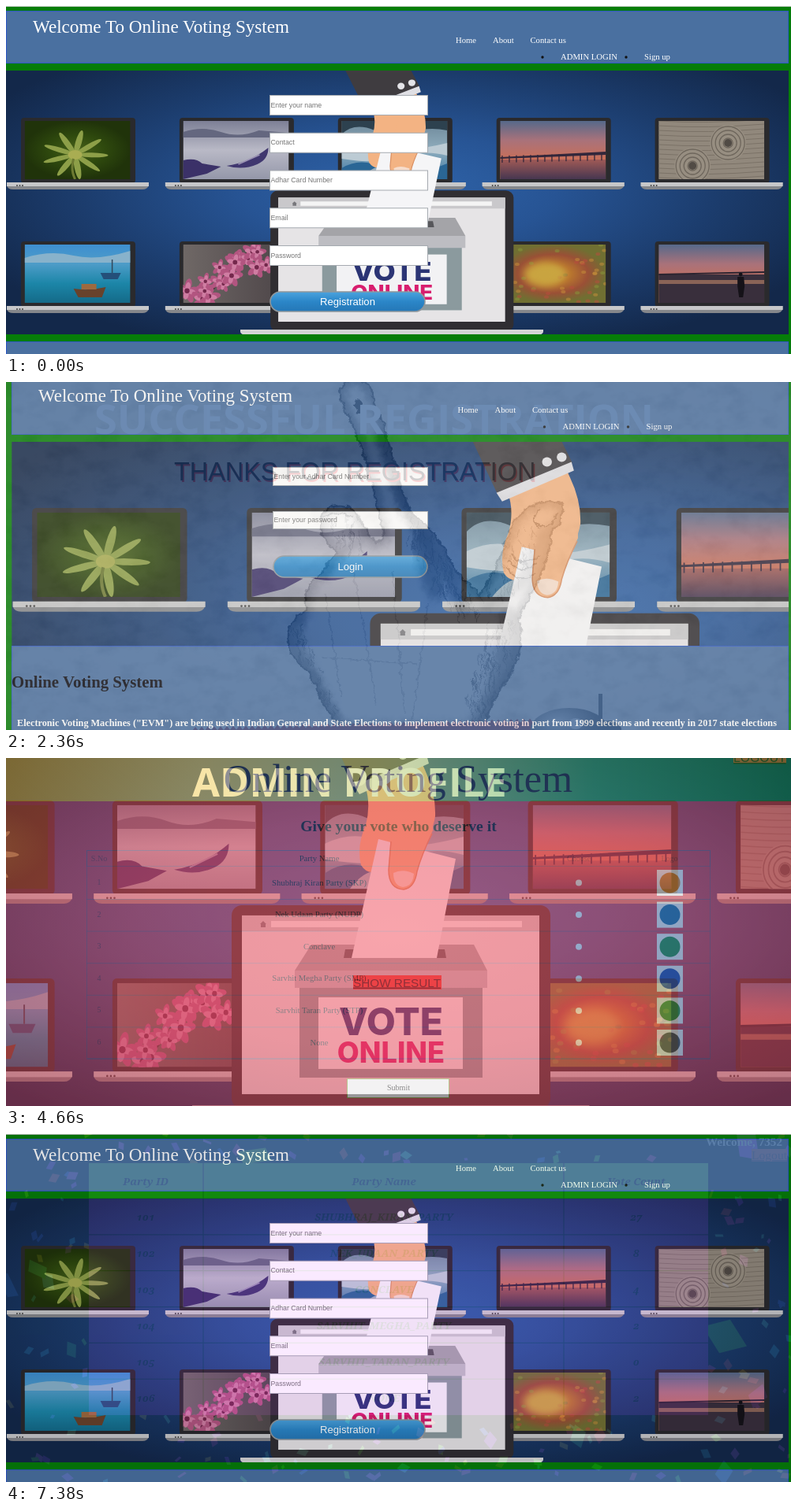
An HTML page that plays this animation: 995x442 px, repeating every 7.44 s.

```html
<!DOCTYPE html>
<html lang="en">
<head>
<meta charset="utf-8">
<title>Online voting slideshow</title>
<style>
html, body { margin: 0; width: 100%; height: 100%; overflow: hidden; background: #000; }
.scene { position: absolute; left: 0; top: 0; width: 100%; height: 100%; will-change: opacity; }
.defs { position: absolute; width: 0; height: 0; }
.fade { opacity: 0; animation: show 7440ms infinite backwards; }
.last { animation-name: showLast; }
filter { color-interpolation-filters: sRGB; }
text { font-family: "Liberation Serif", serif; }
.sans { font-family: "Liberation Sans", sans-serif; }
.title { font-family: "Open Sans", sans-serif; font-weight: 700; }
.cell { font: italic 700 13.3px "Noto Serif", serif; font-variant-numeric: oldstyle-nums; text-anchor: middle; }
.logo { font-family: Inter, sans-serif; font-weight: 800; }
.mid { text-anchor: middle; }
.bold { font-weight: 700; }
.link { text-decoration: underline; }
@keyframes show {
  0% { opacity: 0; animation-timing-function: step-end; }
  9.408% { opacity: .1; animation-timing-function: steps(9, end); }
  16.666% { opacity: 1; animation-timing-function: step-end; }
  33.4%, 100% { opacity: 0; }
}
@keyframes showLast {
  0% { opacity: 0; animation-timing-function: step-end; }
  9.408% { opacity: .1; animation-timing-function: steps(9, end); }
  16.666% { opacity: 1; animation-timing-function: step-end; }
  26.075% { opacity: .9; animation-timing-function: steps(9, end); }
  33.333%, 100% { opacity: 0; }
}
</style>
</head>
<body>
<script>
let seed = 41;
const rnd = (a = 1, b = 0) => b + (a - b) * ((seed = seed * 16807 % 2147483647) / 2147483647);
const range = (n, f) => Array.from({ length: n }, (_, i) => f(i)).join('');

const rect = (x, y, w, h, fill, more = '') =>
  `<rect x="${x}" y="${y}" width="${w}" height="${h}" fill="${fill}" ${more}/>`;
const dot = (x, y, rx, fill, ry = rx, more = '') =>
  `<ellipse cx="${x}" cy="${y}" rx="${rx}" ry="${ry}" fill="${fill}" ${more}/>`;
const path = (d, fill, more = '') => `<path d="${d}" fill="${fill}" ${more}/>`;
const line = (d, stroke, width, more = '') =>
  path(d, 'none', `stroke="${stroke}" stroke-width="${width}" ${more}`);
const text = (x, y, str, size, fill, cls = '') =>
  `<text x="${x}" y="${y}" font-size="${size}" fill="${fill}" class="${cls}">${str}</text>`;
const clip = (x, y, w, h, inner) =>
  `<svg x="${x}" y="${y}" width="${w}" height="${h}" viewBox="${x} ${y} ${w} ${h}">${inner}</svg>`;
const stops = list => list.map((c, i) => `<stop offset="${i / (list.length - 1)}" stop-color="${c}"/>`).join('');
const linear = (id, list, across = false) =>
  `<linearGradient id="${id}" ${across ? '' : 'x2="0" y2="1"'}>${stops(list)}</linearGradient>`;
const radial = (id, list, more = '') => `<radialGradient id="${id}" ${more}>${stops(list)}</radialGradient>`;
const wall = (sx, sy, x, y) => `<use href="#wall" transform="matrix(${sx} 0 0 ${sy} ${x} ${y})"/>`;

// Pictures on the small laptops, 134 x 74 each
const full = fill => rect(0, 0, 134, 74, fill);
const petals = (x, y, n, len, w, fill) => range(n, i =>
  dot(x, y - len / 2, w, fill, len / 2, `transform="rotate(${i * 360 / n + 12} ${x} ${y})"`));
const rings = (x, y) => [6, 11, 16, 21].map(r =>
  `<circle cx="${x}" cy="${y}" r="${r}" fill="none" stroke="#6e665c" stroke-width="1.3"/>`).join('') + dot(x, y, 5, '#514b45');
const blossom = (x, y, r) => petals(x, y, 5, r, r * .27, '#b25580') + petals(x, y, 4, r * .7, r * .2, '#cf7da2')
  + dot(x, y, r * .2, '#74284c');

const flower = full('url(#leaf)') + `<g transform="translate(0 12) scale(1 .75)">${petals(64, 41, 9, 42, 4, '#8d9f48')}</g>`
  + dot(64, 43, 9, '#a9ad52', 6) + line('M62 48Q58 62 64 74', '#6d7a32', 3);
const rowboat = full('url(#mist)') + path('M0 14Q25 6 48 14T96 12L134 15V21H0Z', '#64677f')
  + path('M0 50Q16 46 24 54L48 58 30 67 0 74Z', '#3b3168')
  + path('M55 57Q84 53 108 34Q108 49 94 55Q76 63 55 57Z', '#40376f') + line('M70 55L97 43', '#9b93b4', 1.5);
const ice = full('url(#frost)') + path('M0 0H134V12Q108 7 88 15T42 12 0 17Z', '#2d414f')
  + path('M0 34Q28 22 52 32T134 28V44Q104 36 78 46T0 48Z', '#bccbd4')
  + path('M0 60Q24 45 54 60T134 54V74H0Z', '#2a6695') + path('M24 74Q45 49 62 64L84 74Z', '#9fb6c4');
const pier = full('url(#sunset)') + rect(0, 49, 134, 25, 'url(#dusk)')
  + path('M0 46L134 39V43L0 48Z', '#33273b') + range(15, i => rect(9 * i + 2, 44 - i * .2, 1.3, 9, '#33273b'));
const sand = full('#91887c') + range(13, i => line(`M0 ${i * 6}Q60 ${i * 6 + 4} 134 ${i * 6 - 2}`, '#7b7267', 1))
  + dot(88, 28, 23, '#978e81') + dot(43, 57, 23, '#978e81') + rings(88, 28) + rings(43, 57);
const harbour = full('url(#sea)') + path('M0 17Q32 7 62 14T134 8V23H0Z', '#88b2cb')
  + path('M96 36H122L118 44H100Z', '#244f79') + line('M111 19V36', '#31485c', 1.5)
  + path('M62 56Q82 59 103 54L98 67H68Z', '#68422b') + path('M72 50H91V57H72Z', '#9d6a3f');
const spring = full('url(#twig)') + line('M18 74Q60 35 92 0', '#49313a', 4)
  + range(16, i => blossom(14 + i * 5.5 + rnd(9, -9), 62 - i * 3.2 + rnd(15, -15), rnd(16, 10)));
const daisy = full('url(#bloom)') + range(60, () =>
  dot(rnd(134).toFixed(1), rnd(74).toFixed(1), 3, ['#c9923a', '#bb4c3e', '#879a3a'][rnd(3) | 0], 2, 'opacity=".5"'))
  + dot(56, 38, 25, '#c9a440', 15, 'filter="url(#soft)"');
const beach = full('url(#sunset)') + path('M0 38H134V74H0Z', '#392f3c') + rect(0, 45, 134, 5, '#8a6457')
  + line('M0 38L134 35', '#2c2430', 2) + dot(104, 38, 2.4, '#151218') + path('M100 41H108L109 53 107 67H102L100 53Z', '#151218');

const laptop = (col, row, picture) => {
  const x = 19 + 200.9 * col, y = row ? 299 : 142;
  return rect(x, y, 145, 83, '#2a2a2d', 'rx="4"')
    + `<svg x="${x + 4.6}" y="${y + 4}" width="134" height="74" viewBox="0 0 134 74">${picture}</svg>`
    + path(`M${x - 18} ${y + 82}h180v4q-2 5 -8 5h-164q-7 0 -8 -5z`, '#85878b')
    + rect(x - 18, y + 82, 180, 5, '#c6c7c9') + range(3, i => dot(x - 5 + i * 3.5, y + 86, 1, '#444'));
};

const box = rect(286, 187, 404, 258, '#302e32', 'rx="13"') + rect(299, 200, 377, 227, '#e6e4e6')
  + rect(299, 200, 377, 20, '#c9c8cb') + rect(336, 207, 318, 8, '#f4f4f4') + path('M322 211l4-4 4 4h-1v4h-6v-4z', '#77777c')
  + path('M387 237H593L610 270H366Z', '#a4a4a8') + path('M430 243H556L558 254H428Z', '#57575b')
  + rect(372, 285, 232, 121, '#8b9a9e') + rect(366, 270, 244, 22, '#bdbdc2')
  + rect(396, 304, 183, 91, '#f2f2f4')
  + text(488, 352, 'VOTE', 48, '#2b3474', 'logo mid') + text(488, 387, 'ONLINE', 36.2, '#d81e6e', 'logo mid');
const hand = path('M455 35Q463 58 456 85Q444 112 450 136Q460 152 478 140L520 118Q540 100 544 74Q545 45 531 15L526 4Z', '#f3b383')
  + path('M472 103L570 128 546 254H438Z', '#f5f5f7')
  + path('M488 92L485 142Q485 166 504 167Q518 165 521 144Q528 118 541 92L540 55H500Z', '#f3b383')
  + line('M488 106L485 142Q485 166 504 167Q518 165 521 144Q527 122 540 96', '#d98f62', 1.5)
  + path('M491 146Q503 140 517 147Q516 163 503 164Q491 162 491 146Z', '#f6dccb')
  + path('M410 -34H519L534 -3 442 36Z', '#3f3c40') + path('M441 35L533 -4 536 7 448 46Z', '#dfdfe4')
  + dot(503, -4, 6, '#e4e4e8') + dot(521, -10, 6, '#e4e4e8');

const outline = 'M425 440L405 415 385 370Q360 350 358 330Q352 308 380 290Q374 262 400 243L420 215Q404 206 398 185'
  + 'Q398 160 420 157Q444 156 450 178L470 205 479 198 467 140 450 80 425 25Q420 2 435 -3Q457 -6 464 15L480 60 495 115 512 165'
  + 'Q545 185 570 240L600 270Q622 238 637 195Q648 156 685 152Q708 152 706 164Q704 184 692 187Q690 225 668 265L650 300'
  + 'Q660 330 640 370L615 410 606 440Z';

const defs = radial('room', ['#2f64aa', '#275494', '#1c3d6e', '#13284a'], 'cx=".5" cy=".42" r=".6"')
  + radial('leaf', ['#47601a', '#2f4a0e', '#20330a']) + linear('mist', ['#7d8096', '#b9b9c6', '#9497a9'])
  + linear('frost', ['#6d8799', '#8fadbd', '#3a77a4']) + linear('sunset', ['#56698a', '#a9727a', '#c96f58', '#d08f60'])
  + linear('dusk', ['#a05a56', '#463650']) + linear('sea', ['#3e8fd0', '#4d9cc8', '#1c86a8', '#146a88'])
  + linear('twig', ['#6f6866', '#4c4447'], true) + radial('bloom', ['#d0ae48', '#b9762f', '#9a5036', '#706f32'])
  + linear('button', ['#4ba3de', '#2b86c8', '#2577b6']) + linear('banner', ['#e0a010', '#f2cc50', '#b8cc70', '#30a050', '#0a8030'], true)
  + radial('red', ['#fc5562', '#ee4a5a', '#b83448'], 'r=".68"') + radial('tone', ['#e9e4db', '#e0dad0', '#cfc8bd'], 'r=".7"')
  + radial('metal', ['#b9b9b9', '#777', '#333'], 'cx=".35" cy=".3"')
  + `<filter id="paper" x="0" y="0" width="1" height="1"><feTurbulence type="fractalNoise" baseFrequency=".035 .05" numOctaves="6" seed="4"/>
     <feColorMatrix values="0 0 0 0 .4  0 0 0 0 .38  0 0 0 0 .35  1.6 0 0 0 -.7"/></filter>
     <filter id="rough"><feTurbulence type="fractalNoise" baseFrequency=".12" numOctaves="3" seed="8"/>
     <feDisplacementMap in="SourceGraphic" scale="8" xChannelSelector="R" yChannelSelector="G"/></filter>
     <filter id="soft" x="-.5" y="-.5" width="2" height="2"><feGaussianBlur stdDeviation="5"/></filter>
     <clipPath id="skin"><path d="${outline}"/></clipPath>`
  + '<g id="wall">' + rect(0, 82, 995, 360, 'url(#room)')
  + [flower, rowboat, ice, pier, sand].map((p, i) => laptop(i, 0, p)).join('')
  + laptop(0, 1, harbour) + laptop(1, 1, spring) + laptop(3, 1, daisy) + laptop(4, 1, beach)
  + `<g transform="translate(117 104.5) scale(.7628 .6944)">${box}${hand}</g>`
  + path('M297 411H681V414Q680 418 672 418H306Q298 418 297 414Z', '#d4d4d6') + '</g>';

// Shared parts of the two form pages
const panel = (x, y, w, h) => rect(x + .5, y + .5, w - 1, h - 1, '#4a70a0', 'stroke="#2f58c4"');
const nav = (x, y) => text(x, y, 'Home', 10.67, '#fff') + text(x + 47, y, 'About', 10.67, '#fff')
  + text(x + 94.5, y, 'Contact us', 10.67, '#fff') + text(x + 133, y + 21, 'ADMIN LOGIN', 10.67, '#fff')
  + text(x + 239, y + 21, 'Sign up', 10.67, '#fff') + dot(x + 110, y + 18, 1.7, '#111') + dot(x + 216, y + 18, 1.7, '#111');
const field = (x, y, w, h, hint) => rect(x + .5, y + .5, w - 1, h - 1, '#fff', 'stroke="#a5aab0"')
  + text(x + 1.5, y + h / 2 + 2.5, hint, 8.75, '#757575', 'sans');
const button = (x, y, w, h, label) =>
  rect(x + 1, y + 1, w - 2, h - 2, 'url(#button)', `rx="${h / 2 - 1}" stroke="#8f979c" stroke-width="1.6"`)
  + text(x + w / 2, y + h / 2 + 4.6, label, 13.1, '#fff', 'sans mid');
const heading = 'Welcome To Online Voting System';

const register = rect(0, 0, 995, 442, '#067d08') + rect(0, 0, 995, 1, '#c9cfc9') + panel(0, 6, 992, 67)
  + text(34, 34, heading, 23.1, '#fff') + nav(570, 47)
  + clip(0, 82, 992, 335, wall(1, 1, 0, 0))
  + ['Enter your name', 'Contact', 'Adhar Card Number', 'Email', 'Password']
    .map((h, i) => field(334, 113 + i * 47.75, 201, 26, h)).join('')
  + button(334, 362, 198, 27, 'Registration') + panel(0, 426, 992, 17);

const hatch = (x1, y1, x2, y2, n, spread) => line(range(n, () => {
  const k = rnd(), dx = rnd(spread, -spread), len = rnd(18, 5);
  return `M${(x1 + (x2 - x1) * k + dx).toFixed(1)} ${(y1 + (y2 - y1) * k).toFixed(1)}l${rnd(5, -3).toFixed(1)} ${len.toFixed(1)}`;
}), '#1d1c1c', 1, 'opacity=".5"');
const shade = (d, w, o) => line(d, '#2a2725', w, `opacity="${o}" filter="url(#soft)" stroke-linecap="round"`);
const sketch = '<g filter="url(#rough)">' + path(outline, '#dfdad3')
  + '<g clip-path="url(#skin)">' + shade(outline, 15, .6)
  + shade('M474 70L505 160Q540 205 580 285', 16, .65) + shade('M640 300Q640 370 600 435', 28, .5)
  + shade('M372 300L370 335 420 430', 12, .5) + shade('M478 195Q430 200 402 250', 10, .4) + shade('M680 190L660 250 610 285', 12, .45)
  + shade('M525 205L545 265', 24, .6)
  + hatch(485, 70, 525, 190, 60, 8) + hatch(525, 190, 585, 290, 130, 18) + hatch(630, 300, 595, 430, 130, 20)
  + hatch(368, 305, 410, 425, 70, 12) + hatch(420, 170, 440, 205, 35, 18) + hatch(660, 180, 620, 270, 50, 22)
  + '</g>' + line(outline, '#1f1e1e', 2.4, 'opacity=".85"')
  + line('M404 172Q420 162 440 172M636 225Q652 250 672 230M634 234Q652 260 670 242M640 218Q655 238 676 220M676 160Q664 174 676 184Q692 186 700 166', '#2b2a2a', 2)
  + line('M405 270L425 400M440 240L470 410M490 240L505 420M535 280L515 430M400 350L520 358', '#4b4947', 1.6, 'opacity=".4"')
  + dot(447, 30, 5, '#111', 10, 'transform="rotate(-12 447 30)"') + '</g>';
const ribbon = path('M236 444' + range(55, i => `L${236 + i * 8} ${443 - i * .2}l4 -5`) + 'L680 432V444Z', '#8d161c')
  + dot(714, 441, 49, 'url(#metal)', 27) + dot(722, 434, 9, '#c9c9c9', 7) + dot(765, 442, 15, '#292929', 12) + rect(751, 396, 5, 46, '#303030');
const success = rect(0, 0, 995, 442, 'url(#tone)') + rect(0, 0, 995, 442, '#fff', 'filter="url(#paper)" opacity=".45"')
  + sketch + ribbon + text(112, 66, 'SUCCESSFUL REGISTRATION', 52.3, '#f6f7ff', 'title')
  + text(214.5, 126.5, 'THANKS FOR REGISTRATION', 32.4, '#e0262b', 'sans') + text(213, 125, 'THANKS FOR REGISTRATION', 32.4, '#161214', 'sans');

const login = rect(0, 0, 995, 442, '#067d08') + panel(7, -1, 985, 68) + text(41, 25, heading, 22.9, '#fff') + nav(572.5, 39)
  + clip(7, 76, 985, 259, wall(1.355, 1.45, 7.3, -46))
  + field(338, 108, 197, 24, 'Enter your Adhar Card Number') + field(338, 164, 197, 23, 'Enter your password')
  + button(338, 220, 197, 29, 'Login') + panel(7, 335, 985, 108)
  + text(7, 388, 'Online Voting System', 20.8, '#0b0b14', 'bold')
  + text(14, 437, 'Electronic Voting Machines ("EVM") are being used in Indian General and State Elections to implement electronic voting in part from 1999 elections and recently in 2017 state elections', 12.24, '#fff', 'bold');

const parties = [
  ['Shubhraj Kiran Party (SKP)', '#e98a2b'], ['Nek Udaan Party (NUDP)', '#2b78ae'], ['Conclave', '#2f9a50'],
  ['Sarvhit Megha Party (SMP)', '#2c55b8'], ['Sarvhit Taran Party (STP)', '#3a9a3c'], ['None', '#555']];
const rule = 'stroke="#5a6488" stroke-opacity=".45"';
const ballot = rect(0, 0, 995, 442, 'url(#red)') + rect(0, 0, 995, 55, 'url(#banner)')
  + text(497, 43, 'Online Voting System', 50.3, '#20202c', 'mid') + text(497.5, 93, 'Give your vote who deserve it', 19.7, '#1c1418', 'mid bold')
  + rect(102.5, 117.5, 790, 20, 'none', rule) + rect(102.5, 117.5, 790, 264, 'none', rule)
  + text(118, 131, 'S.No', 10, '#8a3848', 'mid') + text(397, 131, 'Party Name', 10.7, '#33222a', 'mid')
  + text(726, 131, 'Choose', 10, '#8a3848', 'mid') + text(841, 131, 'Logo', 10, '#8a3848', 'mid')
  + parties.map(([name, color], i) => {
    const y = 158 + i * 40.6;
    return path(`M102 ${y + 21.5}H893`, 'none', rule) + text(118, y + 3, i + 1, 10, '#8a3848', 'mid')
      + text(397, y + 3.5, name, 10.67, '#33222a', 'mid') + dot(726, y + .5, 4, '#fff')
      + rect(825, y - 16, 33, 33, '#fff') + dot(841.5, y + .5, 13, color);
  }).join('')
  + rect(432.5, 407.5, 129, 24, '#fff', 'stroke="#8aa838"') + text(497.5, 422, 'Submit', 10, '#333', 'mid');

const admin = wall(1.311, 1.44, -153.4, -150.5)
  + text(236, 49, 'ADMIN PROFILE', 50.7, '#fff', 'title')
  + rect(440, 276, 112, 18, '#e5352f') + text(440, 290.5, 'SHOW RESULT', 15.3, '#2a1014', 'sans link')
  + rect(922, -10, 67, 17, '#e5352f') + text(922, 5, 'LOGOUT', 15.8, '#2a1014', 'sans link');

const bright = ['#35c8e8', '#e82d9a', '#54e62c', '#e8c832', '#a52df0', '#3a62f0', '#e8443a', '#62e8b0', '#d850f0'];
const piece = (x, y, w, h, turn, fill) =>
  rect(-w / 2, -h / 2, w, h, fill, `transform="translate(${x} ${y}) rotate(${turn}) skewX(18)"`);
const confetti = range(330, () => piece(rnd(995) | 0, rnd(442) | 0, rnd(12, 4) | 0, rnd(12, 3) | 0, rnd(180) | 0, bright[rnd(9) | 0]))
  + [[315, 28, 36, 17, -8, '#86e81c'], [911, 257, 36, 38, -14, '#4cf01c'], [940, 14, 25, 32, 10, '#b42cf0'], [953, 333, 18, 22, 70, '#7a20e0'],
    [910, 430, 18, 20, 50, '#3a70e8'], [53, 187, 14, 17, 10, '#58b8f0'], [40, 172, 24, 14, 25, '#3ce070'], [725, 384, 17, 20, 35, '#46e88a'],
    [753, 383, 13, 13, 60, '#e83050'], [2, 192, 14, 30, -8, '#2c78e0'], [83, 274, 12, 16, 20, '#38d060'], [614, 389, 14, 14, 50, '#8020e0']]
    .map(p => piece(...p)).join('');
const row = (y, cells) => cells.map((c, i) => `<text x="${[177, 479, 799][i]}" y="${y}" fill="#1a0c20" class="cell">${c}</text>`).join('');
const tally = [['SHUBHRAJ_KIRAN_PARTY', 27], ['NEK_UDAAN_PARTY', 8], ['CONCLAVE', 4], ['SARVHIT_MEGHA_PARTY', 2], ['SARVHIT_TARAN_PARTY', 0], ['NONE', 2]];
const results = rect(0, 0, 995, 442, '#04060a') + confetti
  + rect(105, 37, 785, 45, '#88ff4a') + rect(105, 82, 785, 275, '#cb2cf9')
  + line('M250 37V357M707 37V357' + range(6, i => `M105 ${82 + i * 45.85}H890`), '#2a0c34', 1.2)
  + row(64.5, ['Party ID', 'Party Name', 'Vote Count'])
  + tally.map(([name, votes], i) => row(110 + i * 45.9, [101 + i, name, votes])).join('')
  + text(887, 15, 'Welcome, 7352', 15.2, '#fff', 'bold') + rect(945, 19, 45, 16, '#f0463c') + text(945, 32, 'Logout', 15.6, '#5c1530', 'link');

document.body.innerHTML = `<svg class="defs"><defs>${defs}</defs></svg>`
  + [register, success, login, ballot, admin, results].map((art, i) =>
    `<svg class="scene ${i ? 'fade' : ''} ${i === 5 ? 'last' : ''}" style="animation-delay:${(i - 1) * 1240}ms"
      viewBox="0 0 995 442" preserveAspectRatio="none">${art}</svg>`).join('');
</script>
</body>
</html>
```
